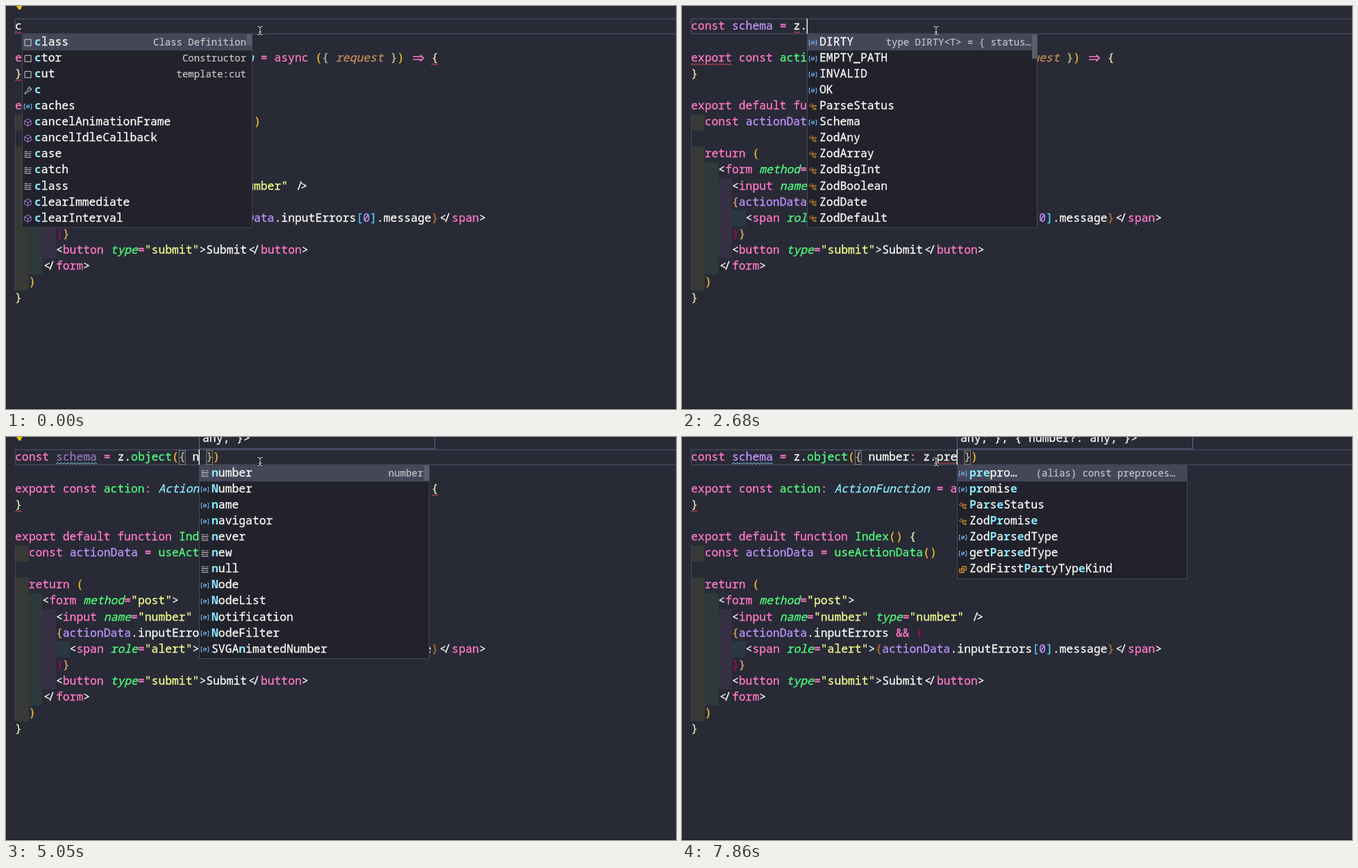
Recreate the animation shown at these times as an HTML page. Size 965 px wide and 581 px high, loop 8000 ms.

```html
<!DOCTYPE html>
<html lang="en">
<head>
<meta charset="utf-8">
<title>Editor typing</title>
<style>
  html, body { margin: 0; width: 100%; height: 100%; overflow: hidden; background: #282a36; }
  svg { display: block; width: 965px; height: 581px; }
  text {
    font: 500 16.38px "Noto Sans Mono", "DejaVu Sans Mono", monospace; white-space: pre; font-variant-ligatures: none;
    fill: currentColor; stroke: currentColor; stroke-width: .3px;
  }
  .italic { font-style: italic; }
  .detail { font-size: 13.96px; stroke-width: .2px; }
  .match { font-weight: 700; color: #8be9fd; stroke-width: 0; }
</style>
</head>
<body>
<svg viewBox="0 0 965 581">
  <rect width="965" height="581" fill="#282a36"/>
  <rect y="580" width="965" height="1" fill="#1b1c25"/>
  <g id="code"></g>
  <path d="M966 18.5H13.5V40H966" fill="none" stroke="#44475a" stroke-width="1.5"/>
  <g id="live"></g>
  <g id="beam" fill="none" stroke-linecap="round"></g>
</svg>
<script>
const LOOP = 8000, LEFT = 13, CHAR = 9.83, ROW = 23.05, BASE = 34, TOP = 41;
const COLORS = {
  p: '#ff79c6', v: '#bd93f9', d: '#8f74b8', g: '#50fa7b', c: '#8be9fd', y: '#f1fa8c', w: '#f8f8f2', l: '#f8f8f2',
  b: '#f5b92c', e: '#ece5b4', r: '#c2bb94', o: '#c28c55', t: '#dda46c', m: '#b8005c', n: '#b0722f', k: '#4fc1ff'
};

const esc = s => s.replace(/&/g, '&amp;').replace(/</g, '&lt;');
const colX = col => LEFT + col * CHAR;
const rect = (x, y, w, h, fill, extra = '') =>
  `<rect x="${x}" y="${y}" width="${w}" height="${h}" fill="${fill}" ${extra}/>`;
const line = (d, stroke, width = 1, extra = '') =>
  `<path d="${d}" fill="none" stroke="${stroke}" stroke-width="${width}" ${extra}/>`;
const label = (x, y, content, color = COLORS.w, extra = '') =>
  `<text x="${x}" y="${y}" color="${color}" ${extra}>${content}</text>`;

// Tokens are split by "|"; the first letter is the colour, upper case means italic.
function codeLine(row, markup) {
  let col = 0;
  return markup.split('|').map(token => {
    const key = token[0], text = token.slice(1), low = key.toLowerCase();
    const tight = key === 'l';
    const style = tight ? 'letter-spacing="-3.6"' : key !== low ? 'class="italic"' : '';
    const out = label(colX(col) + (tight ? 2 : 0), BASE + row * ROW, esc(text), COLORS[low], style);
    col += text.length;
    return out;
  }).join('');
}

const CODE = {
  2: 'pexport const |gaction|p: |CActionFunction|p = async |b(|r{ |Orequest|r }|b) |w   |e{',
  3: 'e}',
  5: 'pexport default function |gIndex|b() |e{',
  6: 'w  |pconst |vactionData|p = |guseActionData|b()',
  8: 'w  |preturn |b(',
  9: 'w    <|pform |Gmethod|p=|y"post"|w>',
  10: 'w      <|pinput |Gname|p=|y"number" |Gtype|p=|y"number" |l/>',
  11: 'w      |t{|vactionData|w.inputErrors |p&& |m(',
  12: 'w        <|pspan |Grole|p=|y"alert"|w>|n{|vactionData|w.inputErrors|k[|v0|k]|w.message|n}|l</|pspan|w>',
  13: 'w      |m)|t}',
  14: 'w      <|pbutton |Gtype|p=|y"submit"|w>Submit|l</|pbutton|w>',
  15: 'w    |l</|pform|w>',
  16: 'w  |b)',
  17: 'e}'
};

// level, first row, row count, tint
const INDENTS = [
  [0, 6, 1, '#ffff40'], [0, 8, 9, '#ffff40'], [1, 9, 7, '#7fff7f'],
  [2, 10, 5, '#ff7fff'], [3, 12, 1, '#4fecec']
];

document.getElementById('code').innerHTML =
  INDENTS.map(([level, row, count, tint]) =>
    rect(colX(level * 2), 18 + row * ROW, CHAR * 2, count * ROW, tint, 'fill-opacity=".07"')).join('') +
  rect(LEFT, 18 + 6 * ROW, 1, 11 * ROW, '#44475a') +
  line('M586 73H600M586 77.2H600M596.5 70.6L601.5 75.1L596.5 79.6', COLORS.p, 1.5) +
  Object.entries(CODE).map(([row, markup]) => codeLine(+row, markup)).join('');

const BEAM = 'M362.5 29.5Q366 29.5 366 32V39Q366 41.5 362.5 41.5M369.5 29.5Q366 29.5 366 32M366 39Q366 41.5 369.5 41.5M364 37.5H368';
document.getElementById('beam').innerHTML = line(BEAM, '#15161c', 2.6) + line(BEAM, '#d8d8d8', 1.1);

// Icons are drawn around (0, 0): colour and path.
const ICONS = {
  s: ['#d4d4d4', 'M-4.5 -4.5H4.5V4.5H-4.5Z'],
  w: ['#d4d4d4', 'M-5 4L0 -1Q-.5 -5 3.5 -5L2 -2.5L3 -1.5L5 -3Q5 1 1 .8L-3.8 5.2Z'],
  v: ['#75beff', 'M-3.5 -3.5H-5.2V3.5H-3.5M3.5 -3.5H5.2V3.5H3.5M-2.2 0A2.2 2 0 1 0 2.2 0A2.2 2 0 1 0 -2.2 0M-2 1.5L2 -1.5'],
  f: ['#b180d7', 'M0 -5L4.6 -2.6V2.6L0 5L-4.6 2.6V-2.6ZM-4.6 -2.6L0 0L4.6 -2.6M0 0V5'],
  k: ['#d4d4d4', 'M-5 -4H0M2 -4H5M-5 -1.3H5M-5 1.4H-1M1 1.4H4M-5 4H5'],
  t: ['#d4d4d4', 'M-5 -4H5M-3 -1.3H4M-5 1.4H4M-3 4H5'],
  c: ['#ee9d28', 'M-4.8 -1.5L-2 -4.3L.2 -2.1L-2.6 .7ZM-1 -.8H2.5M.3 -.8V3.5H2M2.5 -.8L4 -2L5 -.8L3.8 .6ZM2 3.5L3.5 2.2L5 3.5L3.5 4.8Z'],
  e: ['#ee9d28', 'M-1 -1V-4.5H5V1H1.5M1 -2.2H3.4M-5 -1H1.5V4.5H-5ZM-3.4 1H0M-3.4 2.8H0']
};

// Items: icon letter, name, optional detail after "|".
const LISTS = {
  C: ['sclass|Class Definition', 'sctor|Constructor', 'scut|template:cut', 'wc', 'vcaches', 'fcancelAnimationFrame',
    'fcancelIdleCallback', 'kcase', 'kcatch', 'kclass', 'fclearImmediate', 'fclearInterval',
    'kconst', 'kcontinue', 'vconsole', 'fconfirm', 'vConstantSourceNode', 'vConvolverNode'],
  S: ['kstatic', 'ksuper', 'kswitch', 'vscheduler', 'vscreen', 'fscroll', 'fscrollBy', 'fscrollTo', 'vself',
    'vsessionStorage', 'fsetInterval', 'fsetTimeout', 'fscheduleWork', 'vTaskScheduler', 'tdeviseUserSchema'],
  Q: ['vz', 'vZodError', 'vZodType'],
  Z: ['vDIRTY|type DIRTY<T> = { status…', 'vEMPTY_PATH', 'vINVALID', 'vOK', 'cParseStatus', 'vSchema', 'cZodAny',
    'cZodArray', 'cZodBigInt', 'cZodBoolean', 'cZodDate', 'cZodDefault',
    'vobject', 'voboolean', 'vonumber', 'voptional', 'vostring', 'cZodObject', 'cZodOptional',
    'vprepro…|(alias) const preproces… ', 'vpromise', 'cZodPromise', 'vZodParsedType', 'vgetParsedType', 'eZodFirstPartyTypeKind'],
  N: ['knumber|number', 'vNumber', 'vSVGAnimatedNumber', 'vSVGAnimatedNumberList', 'vname', 'vnavigator',
    'knever', 'knew', 'knull', 'vNode', 'vNodeList', 'vNotification', 'vNodeFilter']
};
const SCROLL_THUMB = { C: 16, Z: 35 };

function matchIndexes(name, word) {
  const low = name.toLowerCase(), start = low.indexOf(word);
  if (start >= 0) return [...word].map((_, i) => start + i);
  let from = -1;
  const found = [...word].map(ch => (from = low.indexOf(ch, from + 1)));
  return found.every((at, i) => at >= 0 && (!i || at > found[i - 1])) ? found : null;
}

function rank(name, word) {
  if (name.toLowerCase().startsWith(word)) return 0;
  if (name[0] === word[0]) return 1;
  return name[0].toLowerCase() === word[0] ? 2 : 3;
}

function popup(x, key, word) {
  const all = LISTS[key].map(item => {
    const [name, detail = ''] = item.slice(1).split('|');
    return { icon: item[0], name, detail, hits: matchIndexes(name, word) };
  }).filter(item => item.hits).sort((a, b) => rank(a.name, word) - rank(b.name, word));
  const shown = all.slice(0, 12);
  let out = rect(x + .5, TOP - .5, 331, Math.floor(shown.length * ROW) + 3, '#21222c', 'stroke="#454651"') +
    rect(x + 1, TOP, 330, ROW, '#454759');
  shown.forEach(({ icon, name, detail, hits }, i) => {
    const y = BASE + (i + 1) * ROW, [stroke, path] = ICONS[icon], shift = icon === 't' ? 8 : 0;
    const spans = [...name].map((ch, n) => hits.includes(n) ? `<tspan class="match">${ch}</tspan>` : ch).join('');
    out += line(path, stroke, 1, `transform="translate(${x + 8.5 + shift} ${y - 4.3})"`) +
      label(x + 18 + shift / 4, y, spans) +
      label(x + 323, y - .5, esc(detail), '#c4c4c4', 'class="detail" text-anchor="end"');
  });
  if (all.length > 12) out += rect(x + 324, TOP, 7.5, SCROLL_THUMB[key] || 22, '#5c5e6c');
  return out;
}

const SIGNATURE = [
  'object(<tspan class="match">shape: z.ZodRawShape</tspan>,', 'params?: RawCreateParams):',
  'z.ZodObject&lt;z.ZodRawShape,', '"strip", z.ZodTypeAny, { [x:', 'string]: any; }, { [x: string]:', 'any; }>'
];

function signature(x, mode) {
  const frame = (y, h) => rect(x + .5, y, 339, h, '#282a36', 'stroke="#5c6694"');
  if (mode === 'below')
    return frame(41.5, 145) + SIGNATURE.map((text, i) => label(x + 5, 60.8 + i * ROW, text)).join('');
  const prop = mode === 'above' ? '' : `, { ${mode}?: any; }`;
  return frame(-30, 47) + label(x + 5, 7, `any; }${prop}>`);
}

function wave(row, col, count, color = '#ff5555') {
  const steps = Math.round(count * CHAR / 2.46);
  let d = `M${colX(col)} ${39 + row * ROW}`;
  for (let i = 0; i < steps; i++) d += `l2.46 ${i % 2 ? 2 : -2}`;
  return line(d, color, .9);
}

const WAVES = {
  c: () => wave(0, 0, 1),
  b: () => wave(2, 61, 1) + wave(3, 0, 1),
  x: () => wave(2, 0, 6),
  z: () => wave(0, 15, 1),
  s: caret => wave(0, 6, Math.min(6, caret - 6), '#8be9fd'),
  n: (caret, word) => wave(0, caret - word.length, word.length),
  q: caret => wave(0, caret + 1, 1)
};

function typedLine(text, dim) {
  const kinds = { const: 'p', '=': 'p', ':': 'p', object: 'g', '(': 'b', ')': 'b', '{': 'r', '}': 'r' };
  return text.split(/(^const(?= |$)|(?<=const )\w+|(?<=z\.)object(?=\()|[=:(){}])/)
    .map((part, i) => (i % 2 ? kinds[part] || (dim ? 'd' : 'v') : 'w') + part)
    .filter(token => token.length > 1).join('|');
}

// time, text before caret, popup list, flags, signature, text after caret
// flags: waves by letter; d dimmed name, o no bulb, h hidden caret
const Z = 'const schema = z', OBJ = Z + '.object(', NUM = OBJ + '{ number';
const STEPS = [
  [0, 'c', 'C', 'cbh'], [150, 'co', 'C', 'cb'], [300, 'con', 'C', 'cb'], [450, 'cons', 'C', 'cb'],
  [590, 'const', 'C', 'cb'], [740, 'const ', '', 'cb'], [890, 'const s', 'S', 'cb'], [1040, 'const sc', 'S', 'cb'],
  [1190, 'const sch', 'S', 'cbs'], [1340, 'const sche', 'S', 'cbs'], [1490, 'const schem', 'S', 'cbs'],
  [1640, 'const schema', 'S', 'cbs'], [1790, 'const schema ', '', 'cbs'], [2090, 'const schema =', '', 'x'],
  [2380, 'const schema = ', '', 'xo'], [2530, Z, 'Q', 'xo'], [2680, Z + '.', 'Z', 'xzo'],
  [2980, Z + '.o', 'Z', 'bo'], [3130, Z + '.ob', 'Z', 'bo'], [3430, Z + '.object', '', 'bo'], [3570, Z + '.object', '', 'b'],
  [3860, OBJ, '', 'b', '', ')'], [4010, OBJ, '', 'bsd', 'below', ')'], [4310, OBJ + '{', '', 'bsd', 'below', '})'],
  [4610, OBJ + '{ ', '', 'bsd', 'below', '})'], [4760, OBJ + '{  ', '', 'bsd', 'below', '})'],
  [4900, OBJ + '{ ', '', 'bsd', 'below', ' })'], [5050, OBJ + '{ n', 'N', 'bsd', 'above', ' })'],
  [5200, OBJ + '{ nu', 'N', 'bsd', 'n', ' })'], [5340, OBJ + '{ num', 'N', 'bsd', 'nu', ' })'],
  [5490, OBJ + '{ num', 'N', 'bsdn', 'num', ' })'], [5790, OBJ + '{ numb', 'N', 'bsdn', 'num', ' })'],
  [5930, OBJ + '{ numbe', 'N', 'bsdn', 'numb', ' })'], [6080, NUM, 'N', 'bsdn', 'numbe', ' })'],
  [6230, NUM, 'N', 'bsdn', 'number', ' })'], [6370, NUM + ':', '', 'bsd', 'number', ' })'],
  [6520, NUM + ': ', '', 'bsd', 'number', ' })'], [6670, NUM + ': ', '', 'q', 'number', ' })'],
  [6960, NUM + ': z', 'Q', 'bs', 'number', ' })'], [7110, NUM + ': z.', 'Z', 'qo', 'number', ' })'],
  [7410, NUM + ': z.p', 'Z', 'bso', 'number', ' })'], [7560, NUM + ': z.pr', 'Z', 'bso', 'number', ' })'],
  [7710, NUM + ': z.pre', 'Z', 'bso', 'number', ' })'], [7860, NUM + ': z.pre', 'Z', 'bsno', 'number', ' })']
];

function view([, typed, list, flags, sig = '', tail = '']) {
  const caret = typed.length, x = Math.round(colX(caret)), word = typed.match(/\w*$/)[0];
  let out = flags.includes('o') ? '' : '<path d="M15.5 0H23V1.5L21.5 2.5V5H17.5V2.5L15.5 1.5Z" fill="#ffcc00"/>';
  if (!tail && typed.endsWith(' ')) out += rect(colX(caret - 1), 19, CHAR, 21, '#7d1a28');
  if (tail) {
    const open = Math.max(typed.lastIndexOf('('), typed.lastIndexOf('{'));
    for (const col of [open, caret + tail.search(/[)}]/)])
      out += rect(colX(col) + .5, 19.5, CHAR - 1, 20, 'none', 'stroke="#7d7e78"');
  }
  out += codeLine(0, typedLine(typed + tail, flags.includes('d')));
  for (const flag of flags) if (WAVES[flag]) out += WAVES[flag](caret, word);
  if (sig) out += signature(x, sig);
  if (list) out += popup(x, list, word);
  return flags.includes('h') ? out : out + rect(x - .5, 18, 1.5, 22, '#e8e8e4');
}

const live = document.getElementById('live');
let current = null;
function tick() {
  const now = performance.now() % LOOP;
  const step = STEPS.findLast(([time]) => time <= now);
  if (step !== current) live.innerHTML = view(current = step);
  requestAnimationFrame(tick);
}
tick();
</script>
</body>
</html>
```
